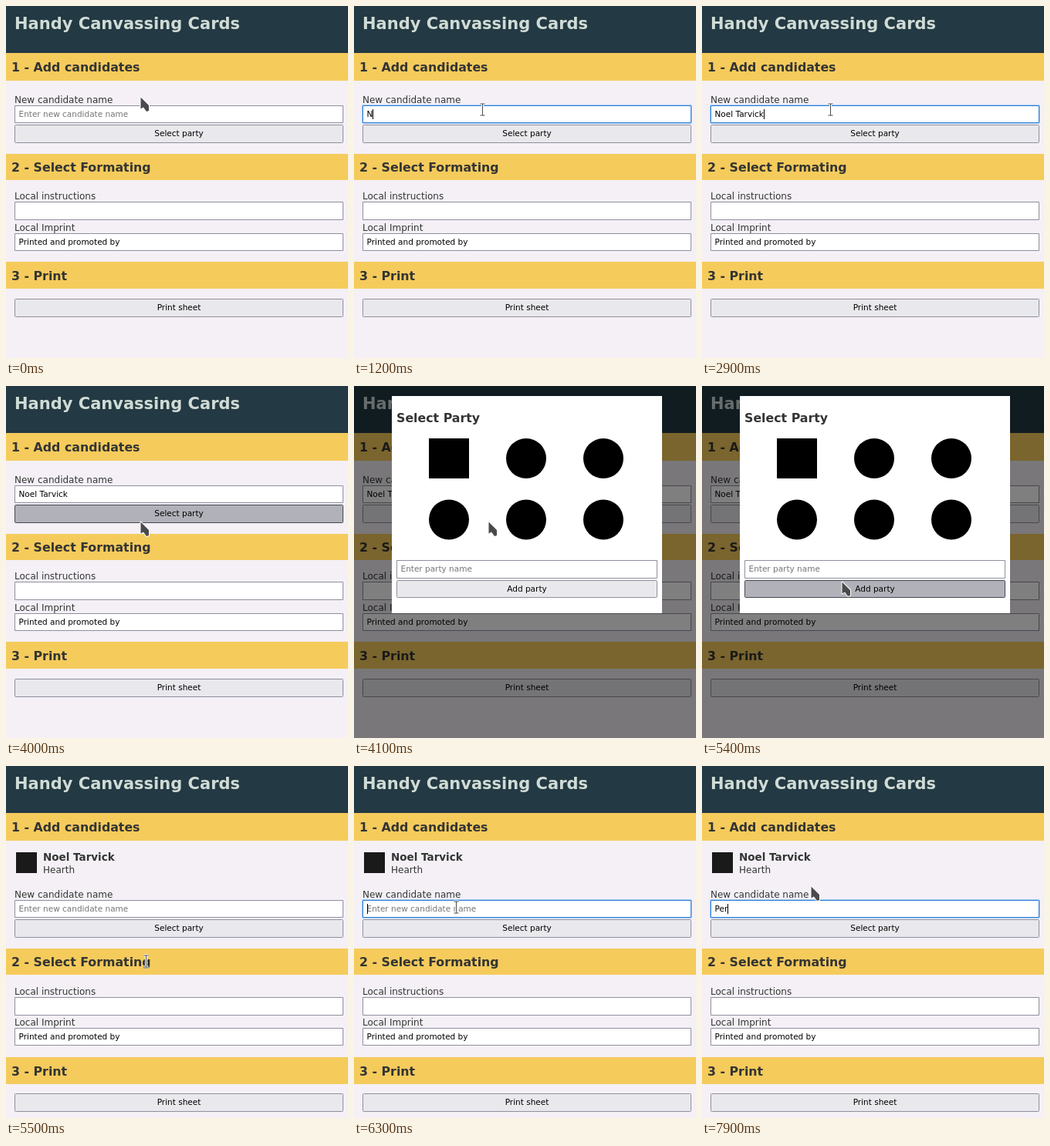
Write an HTML page with a canvas that moves like this. It is 443 by 457 pixels and loops after 8000 ms.

```html
<!DOCTYPE html>
<html lang="en">
<head>
<meta charset="utf-8">
<title>Candidate form</title>
<style>
html, body { margin: 0; width: 100%; height: 100%; overflow: hidden; background: #f4f0f6; }
canvas { display: block; }
</style>
</head>
<body>
<canvas id="stage" width="443" height="457"></canvas>
<script>
const ctx = document.getElementById('stage').getContext('2d');
const LOOP = 8000, STEP = 100;
const PRESS_SELECT = 4000, OPEN = 4100, PRESS_ADD = 5400, ADDED = 5500;
const NAME = 'Noel Tarvick', NEXT = 'Per', PARTY = 'Hearth';
const INK = '#333533';

// Each glide: start, end, x, y
const glides = [
  [0, 300, 165, 143], [500, 700, 166, 134], [3500, 4000, 174, 175], [4100, 4600, 116, 107],
  [4700, 5400, 181, 253], [5600, 5800, 140, 189], [5900, 6000, 132, 183], [6600, 7100, 141, 155]
];
// Each burst of typing: start, end, letters
const nameBursts = [[1100, 1200, 1], [1300, 1600, 4], [1600, 2200, 3], [2500, 2900, 4]];
const nextBursts = [[7600, 7700, 1], [7800, 7900, 2]];

const progress = (t, start, end) => Math.min(1, Math.max(0, (t - start) / (end - start)));
const easeOut = u => 1 - (1 - u) ** 3;

function pointerAt(t) {
  let x = 174, y = 117;
  for (const [start, end, toX, toY] of glides) {
    const k = easeOut(progress(t, start, end));
    x += (toX - x) * k;
    y += (toY - y) * k;
  }
  return { x: Math.round(x), y: Math.round(y) };
}

const typed = (word, bursts, t) => word.slice(0, bursts.reduce(
  (n, [start, end, letters]) => n + Math.floor(letters * progress(t, start, end)), 0));

let pointer, live, overText;
const hovered = (x, y, w, h) => live && pointer.x >= x && pointer.x < x + w
  && pointer.y >= y && pointer.y < y + h;

function text(s, x, y, size, color = INK, bold = false, align = 'left') {
  ctx.font = `${bold ? 'bold ' : ''}${size}px "DejaVu Sans", sans-serif`;
  ctx.fillStyle = color;
  ctx.textAlign = align;
  ctx.fillText(s, x, y);
}

function rect(x, y, w, h, color) {
  ctx.fillStyle = color;
  ctx.fillRect(x, y, w, h);
}

function box(x, y, w, h, fill, stroke, radius) {
  ctx.beginPath();
  ctx.roundRect(x + .5, y + .5, w - 1, h - 1, radius);
  ctx.fillStyle = fill;
  ctx.fill();
  ctx.strokeStyle = stroke;
  ctx.lineWidth = 1;
  ctx.stroke();
}

function button(label, x, y, w, h, pressed) {
  const [fill, stroke] = pressed ? ['#b1b1b9', '#484851']
    : hovered(x, y, w, h) ? ['#d0d0d7', '#676774'] : ['#e9e9ed', '#8f8f9d'];
  box(x, y, w, h, fill, stroke, 1);
  text(label, 224, y + 15, 10.5, '#000', false, 'center');
}

function input(value, hint, x, y, w, h, focused) {
  const hover = hovered(x, y, w, h);
  overText ||= hover;
  if (focused) box(x - 1, y - 1, w + 2, h + 2, '#fff', '#a9cdf3', 1);
  box(x, y, w, h, '#fff', focused ? '#2a7bd6' : hover ? '#676774' : '#8f8f9d', 0);
  text(value || hint, x + 5.5, y + 15, 10.5, value ? '#000' : '#757575');
  if (focused) {
    const width = value ? ctx.measureText(value).width : 0;
    rect(Math.round(x + 5.5 + width), y + 5, 1, 13, '#000');
  }
}

function bar(label, y, h) {
  rect(0, y, 443, h, '#f5cb5c');
  text(label, 7, y + Math.ceil(h / 2) + 6, 15.8, INK, true);
  overText ||= hovered(7, y + 10, ctx.measureText(label).width, 16);
}

function page(t) {
  const added = t >= ADDED;
  const down = y => Math.round(y + (added ? 45.5 : 0));
  const focused = (t >= 300 && t < PRESS_SELECT) || t >= 6300;
  const value = added ? typed(NEXT, nextBursts, t) : typed(NAME, nameBursts, t);

  rect(0, 0, 443, 457, '#f4f0f6');
  rect(0, 0, 443, 61, '#233943');
  text('Handy Canvassing Cards', 11, 30, 21, '#cfdbd5', true);
  bar('1 - Add candidates', 61, 36);
  if (added) {
    rect(13, 112, 27, 27, '#1a1a1a');
    text(NAME, 48, 123, 13.5, INK, true);
    text(PARTY, 48, 139, 12);
  }
  text('New candidate name', 11, down(125.9), 12);
  input(value, 'Enter new candidate name', 11, down(128.9), 426, 23, focused);
  button('Select party', 11, down(153.9), 426, 24, t >= PRESS_SELECT && t < OPEN);
  bar('2 - Select Formating', down(191.9), 34);
  text('Local instructions', 11, down(251), 12);
  input('', '', 11, down(254), 426, 24);
  text('Local Imprint', 11, down(291.9), 12);
  input('Printed and promoted by', '', 11, down(294.9), 426, 23);
  bar('3 - Print', down(332), 35);
  button('Print sheet', 11, down(379.9), 426, 24);
}

function dialog(t) {
  rect(0, 0, 443, 457, 'rgba(0,0,0,.5)');
  rect(49, 13, 350, 282, '#fff');
  text('Select Party', 55, 47, 15.8, INK, true);
  ctx.fillStyle = '#000';
  for (let i = 0; i < 6; i++) {
    const x = 123 + i % 3 * 100, y = 94 + Math.floor(i / 3) * 79.5;
    ctx.beginPath();
    if (i) ctx.arc(x, y, 26, 0, 7);
    else ctx.rect(x - 26, y - 26, 52, 52);
    ctx.fill();
  }
  input('', 'Enter party name', 55, 226, 338, 24);
  button('Add party', 55, 252, 338, 23, t >= PRESS_ADD);
}

const arrow = new Path2D('M0 1V16L3.5 14L7.5 19.5L10.5 18.5V11.5Z');
const beam = new Path2D('M-3 -7.5H3M0 -7.5V7.5M-3 7.5H3');

function drawPointer() {
  const shape = overText ? beam : arrow;
  ctx.save();
  ctx.translate(pointer.x + .5, pointer.y + .5);
  ctx.lineJoin = 'round';
  ctx.strokeStyle = '#fff';
  ctx.lineWidth = overText ? 3 : 2;
  ctx.stroke(shape);
  ctx.fillStyle = ctx.strokeStyle = '#4a4a4a';
  ctx.lineWidth = 1;
  if (overText) ctx.stroke(shape);
  else ctx.fill(shape);
  ctx.restore();
}

function frame(now) {
  const t = Math.floor(now % LOOP / STEP) * STEP;
  const open = t >= OPEN && t < ADDED;
  pointer = pointerAt(t);
  overText = false;
  live = !open;
  page(t);
  live = true;
  if (open) dialog(t);
  drawPointer();
  requestAnimationFrame(() => frame(performance.now() - start));
}

const start = performance.now();
frame(0);
</script>
</body>
</html>
```
